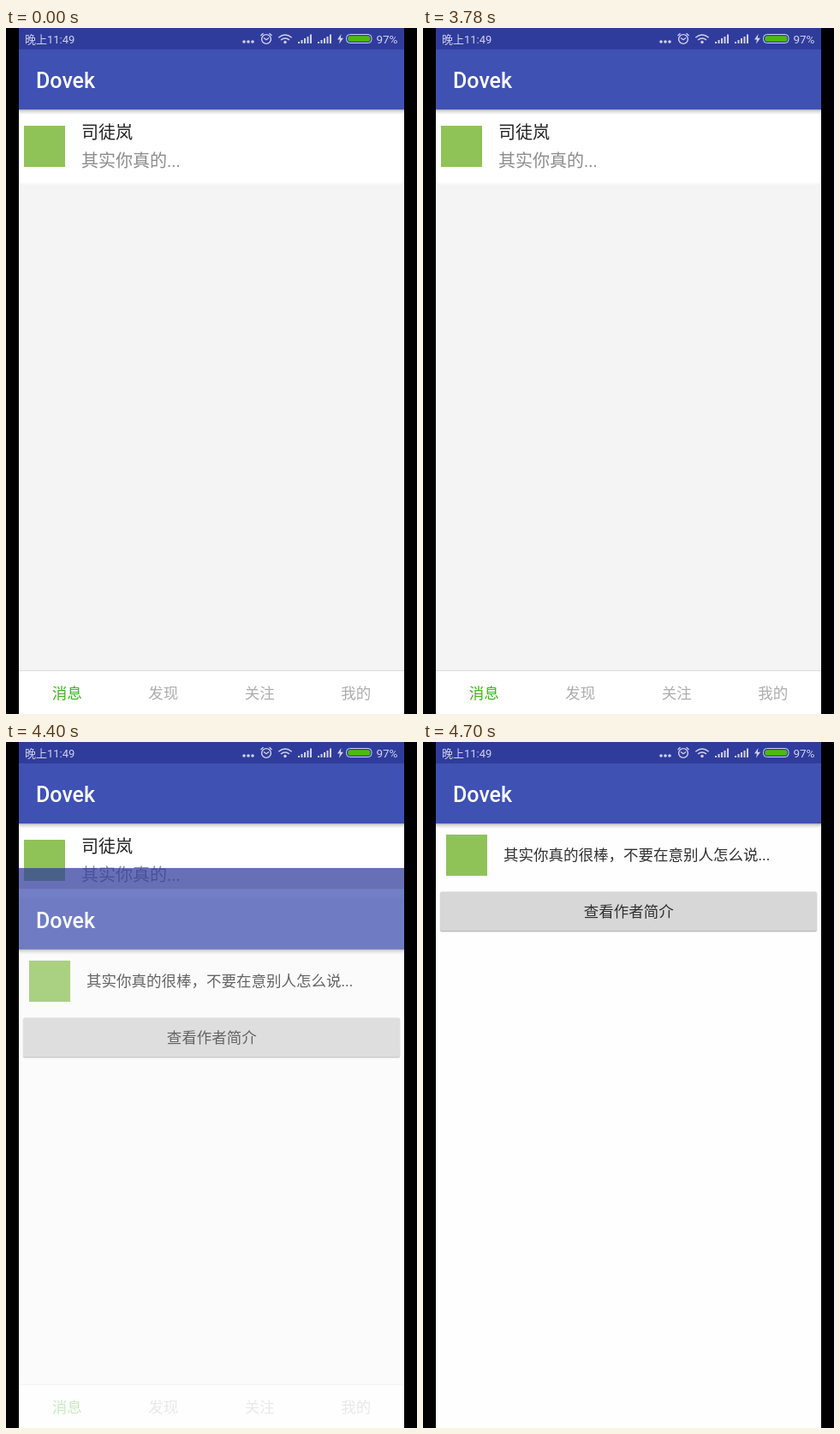
Recreate the animation shown at these times as an HTML page. Size 480 px wide and 800 px high, loop 4.8 s.

```html
<!DOCTYPE html>
<html lang="zh-CN">
<head>
<meta charset="utf-8">
<title>Page transition</title>
<style>
  html, body { margin: 0; height: 100%; overflow: hidden; background: #000; }
  svg { display: block; width: 480px; height: 800px; }
  text { font: 17.5px Roboto, "Noto Sans CJK SC", "Noto Sans CJK", sans-serif; fill: #303030; }
  .mid { text-anchor: middle; }
  .title { font-size: 25px; font-weight: 500; fill: #fff; }
  .item { font-size: 20px; fill: #212121; }
  .sub { fill: #8c8c8c; }
  .tab { fill: #adadad; }
  .active { fill: #3eb41c; }
  .status { font-size: 13px; fill: #d0d3ec; }
  .line { fill: none; stroke: #d0d3ec; stroke-width: 1.4; }
  .glyph { fill: #d0d3ec; }
</style>
</head>
<body>
<svg viewBox="0 0 480 800">
  <defs>
    <linearGradient id="shade" x2="0" y2="1">
      <stop stop-opacity=".3"/>
      <stop offset=".4" stop-opacity=".12"/>
      <stop offset="1" stop-opacity="0"/>
    </linearGradient>
    <g id="appbar">
      <rect x="15" width="450" height="25" fill="#303c9c"/>
      <rect x="15" y="25" width="450" height="70" fill="#3f51b3"/>
      <rect x="15" y="95" width="450" height="6" fill="url(#shade)"/>
      <text class="title" x="35" y="70">Dovek</text>
    </g>
    <path id="signal" d="M0 18v-2h2v2zM3.5 18v-4h2v4zM7 18v-6h2v6zM10.5 18v-8h2v8zM14 18v-10.5h2v10.5z"/>
    <clipPath id="screen"><rect x="15" width="450" height="800"/></clipPath>
  </defs>

  <g clip-path="url(#screen)">
    <rect x="15" width="450" height="800" fill="#f4f4f4"/>
    <rect x="15" y="95" width="450" height="86" fill="#fff"/>
    <rect x="15" y="181" width="450" height="1.5" fill="#f9f9f9"/>
    <use href="#appbar"/>
    <rect x="21" y="114" width="48" height="48" fill="#8fc357"/>
    <text class="item" x="88" y="129">司徒岚</text>
    <text class="item sub" x="88" y="162">其实你真的...</text>
    <rect x="15" y="749" width="450" height="51" fill="#fff"/>
    <rect x="15" y="749" width="450" height="1" fill="#dcdcdc"/>
    <text class="tab mid active" x="71.2" y="781.5">消息</text>
    <text class="tab mid" x="183.7" y="781.5">发现</text>
    <text class="tab mid" x="296.2" y="781.5">关注</text>
    <text class="tab mid" x="408.7" y="781.5">我的</text>

    <g id="detail" opacity="0">
      <rect x="15" width="450" height="800" fill="#fefefe"/>
      <use href="#appbar"/>
      <rect x="27" y="108" width="48" height="48" fill="#8fc357"/>
      <text x="94" y="138">其实你真的很棒，不要在意别人怎么说...</text>
      <rect x="19.5" y="175" width="441" height="47" rx="3" opacity=".1"/>
      <rect x="20" y="175" width="440" height="46" rx="2" opacity=".18"/>
      <rect x="20" y="174.5" width="440" height="45.5" rx="2" fill="#d7d7d7"/>
      <text class="mid" x="240.3" y="204.3">查看作者简介</text>
    </g>

    <text class="status" x="22" y="17.5">晚上11:49</text>
    <g class="glyph">
      <circle cx="278" cy="16" r="1.8"/>
      <circle cx="283" cy="16" r="1.8"/>
      <circle cx="288" cy="16" r="1.8"/>
      <use href="#signal" x="341"/>
      <use href="#signal" x="364"/>
      <path d="M391.5 7l-4.5 6.5h3l-1 5 5-6.7h-3.2z"/>
      <circle cx="326" cy="16.5" r="1.7"/>
    </g>
    <g class="line">
      <circle cx="304" cy="13" r="5.4"/>
      <path d="M301 11.5l3 2.2 3-2.2M297.5 9l3-2.7M310.5 9l-3-2.7"/>
      <path d="M318.3 11.3q7.7-6.6 15.4 0M321 14q5-4.2 10 0"/>
      <rect x="397.5" y="7.5" width="29.5" height="10" rx="4" stroke-width="1"/>
    </g>
    <rect x="399.3" y="9.3" width="26" height="6.5" rx="2.5" fill="#4cbb0c"/>
    <text class="status" x="457.5" y="17.5" text-anchor="end" style="font-size:13.5px">97%</text>
  </g>
</svg>
<script>
  const LOOP = 4800, STEP = 100, START = 4300, END = 4578.5;
  const detail = document.getElementById("detail");
  const start = performance.now();

  function draw() {
    const time = (performance.now() - start) % LOOP;
    const t = Math.floor(time / STEP) * STEP; // the screen refreshes ten times a second
    const left = Math.min(1, Math.max(0, (END - t) / (END - START)));
    const fade = Math.min(1, Math.max(0, (t - START) / 137));
    detail.setAttribute("transform", `translate(0 ${558 * left ** 3})`);
    detail.setAttribute("opacity", fade);
    requestAnimationFrame(draw);
  }
  draw();
</script>
</body>
</html>
```
